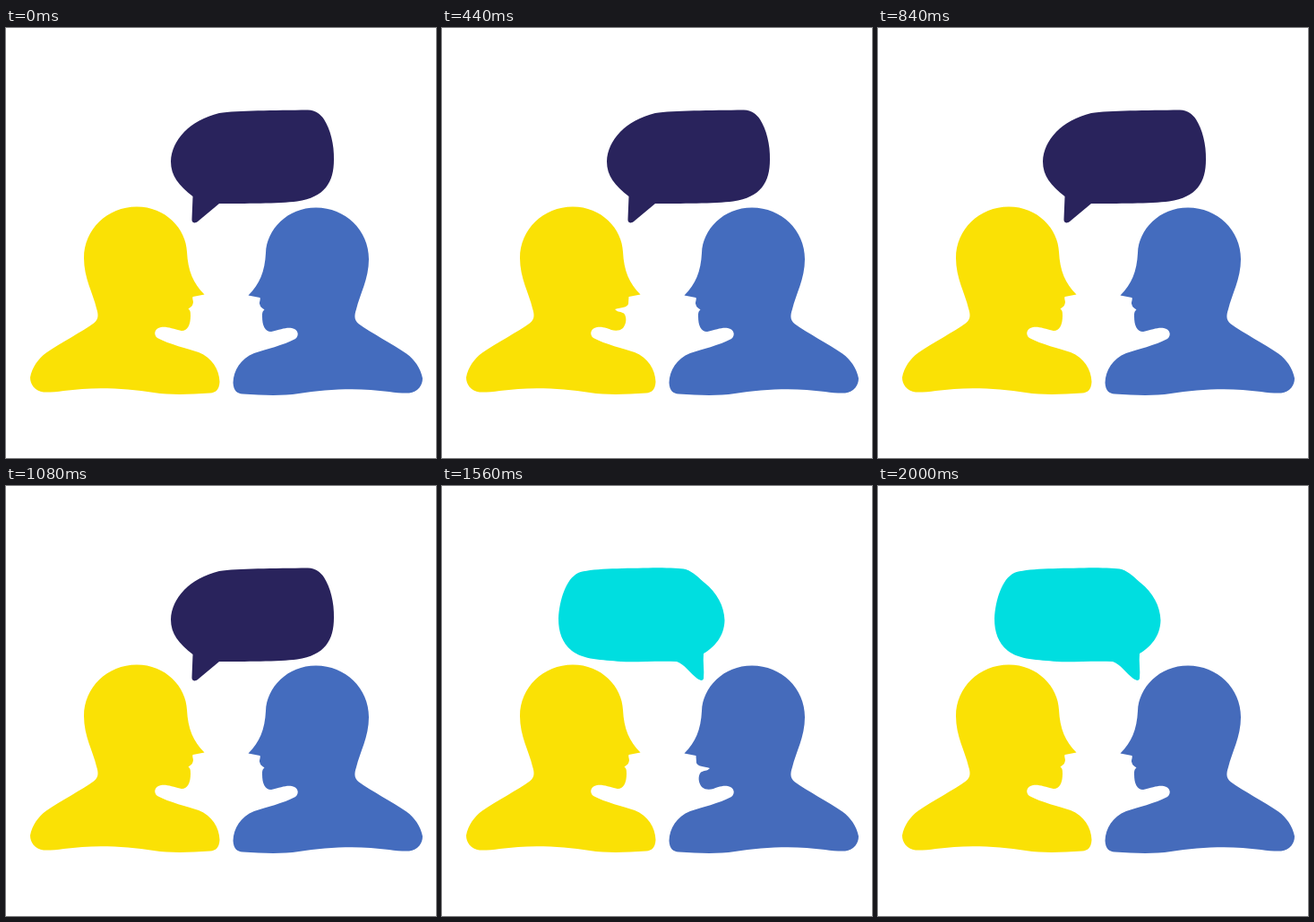
These frames come from a looping animation (480 px wide and 480 px high, 2680 ms). An HTML page with a canvas:

```html
<!DOCTYPE html>
<html lang="en">
<head>
<meta charset="utf-8">
<title>Conversation</title>
<style>
html, body { margin: 0; width: 100%; height: 100%; overflow: hidden; background: #fff; }
canvas { display: block; }
</style>
</head>
<body>
<canvas id="stage" width="480" height="480"></canvas>
<script>
const ctx = document.getElementById('stage').getContext('2d');
const LOOP = 2680;
const REPLY = 1280;

// Times at which each mouth flips between closed and open
const leftFlips = [120, 160, 200, 240, 280, 360, 440, 520, 600, 640,
                   680, 720, 760, 840, 880, 960, 1000, 1080];
const rightFlips = [1280, 1400, 1560, 1600, 1720, 1800, 1880, 2000];

const face = 'M146 199.5 C178 199.5 201 224 202 250 C203 271 209 285 221.5 297.5 L208.5 300 ';
const closedJaw = 'C207.5 303 210 305 208.5 308 C208 311 205 312 203.5 313.5 ' +
  'C206 315 206 318 206 321 C206 331 203 338 196 338 ';
const openJaw = 'L208 308 C207 312 200 312 193 314 C196 317.5 200 316.5 203 318.5 ' +
  'C207 323 205.5 331 202 335 C198 338.5 193 338 189 337 ';
const torso = 'C186 336 180 333 173 334 C166 335 164 342 169 346 ' +
  'C182 353 203 358 215 362 C230 368 238 381 238.5 395 C238 404 234 407 228 407.5 ' +
  'C205 409 185 410 165 407 C140 403 110 401 85 403 C70 404 55 407 42 406.5 ' +
  'C32 405 27 398 27 390 C29 379 36 369 45 362.5 C60 352 85 339 98 329.5 ' +
  'C104 325 103 319 101 313 C97 296 87 279 87 257 C87 225 113 199.5 146 199.5 Z';

const closedHead = new Path2D(face + closedJaw + torso);
const openHead = new Path2D(face + openJaw + torso);

const askBubble = new Path2D(
  'M208.5 188 C193 176 184 165 184 149 C185 125 205 103 238 95 ' +
  'C258 92 300 92 337 91.5 C346 92 351 96 355 102 C362 113 366.5 130 366 147 ' +
  'C366 172 356 189 325 193.5 C305 196 265 196 238 196 L214 216 ' +
  'C210 219 207 217 207.5 213 Z');
const replyBubble = new Path2D(
  'M152 97 C165 92 200 92 230 91.5 C250 91 265 92 272 93 ' +
  'C281 96 287 103 293 108 C307 119 315 134 315.5 150 C315 168 304 180 292 187 ' +
  'C291 196 293 206 292 215 C291 218 288 217 285 215 C277 209 271 199 262 196 ' +
  'C240 195 215 197 200 196 C178 194 158 194 145 184 C134 175 130 163 130 148 ' +
  'C131 128 138 104 152 97 Z');

function fill(path, color) {
  ctx.fillStyle = color;
  ctx.fill(path);
}

function head(flips, t) {
  const count = flips.filter(time => time <= t).length;
  return count % 2 ? openHead : closedHead;
}

function draw(t) {
  const replying = t >= REPLY;
  ctx.fillStyle = '#fff';
  ctx.fillRect(0, 0, 480, 480);

  if (replying) fill(replyBubble, '#00dee0');
  else fill(askBubble, '#29235c');

  fill(head(leftFlips, t), '#fae105');

  ctx.save();
  ctx.translate(492, 1);
  ctx.scale(-1, 1);
  fill(head(rightFlips, t), replying ? '#456bbb' : '#446cbe');
  ctx.restore();
}

const start = performance.now();
function tick() {
  draw((performance.now() - start) % LOOP);
  requestAnimationFrame(tick);
}
tick();
</script>
</body>
</html>
```
